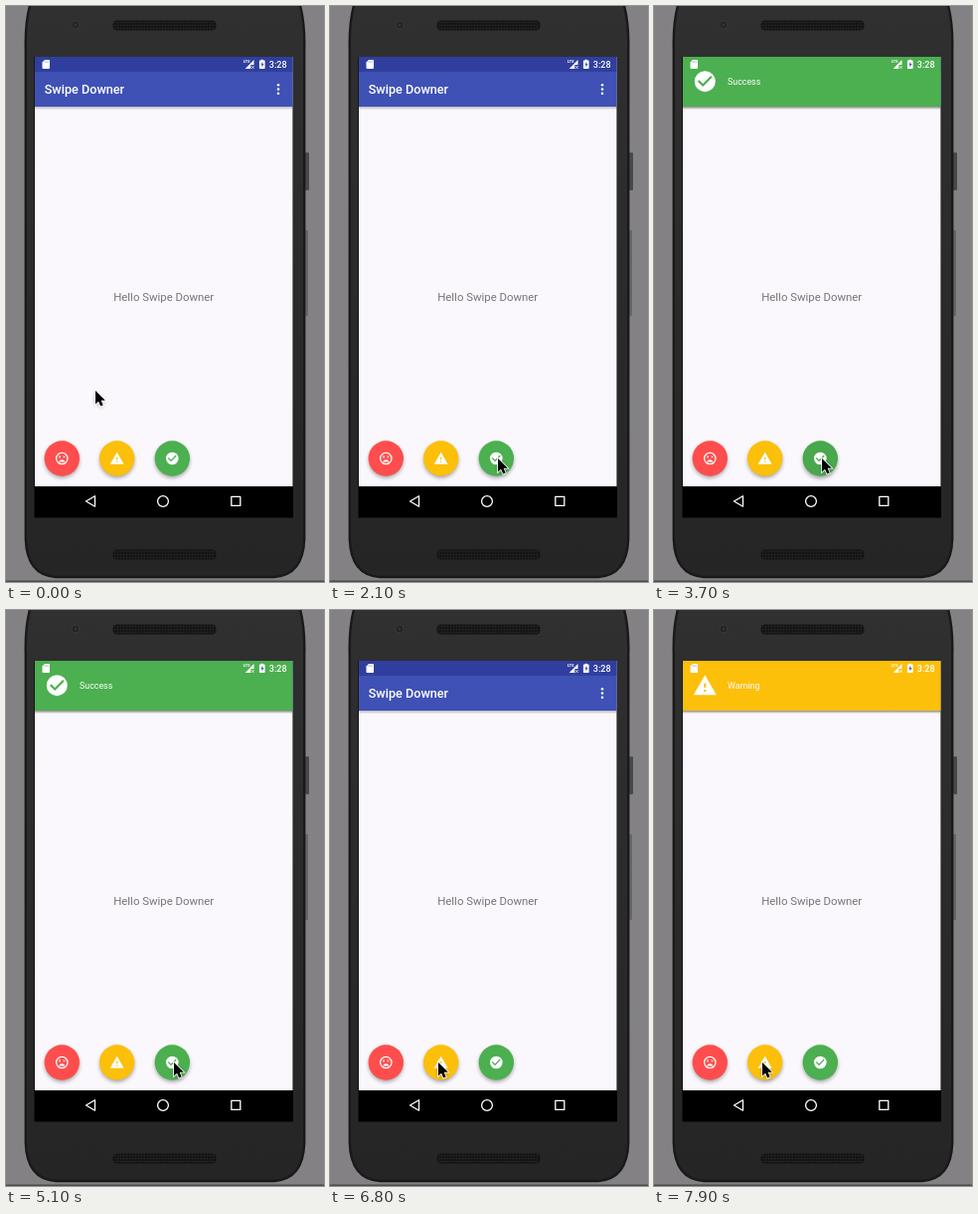
Write an HTML page that moves like this. It is 320x578 px and loops after 8 s.

```html
<!DOCTYPE html>
<html lang="en">
<head>
<meta charset="utf-8">
<title>Swipe Downer</title>
<style>
  html, body { margin: 0; width: 100%; height: 100%; overflow: hidden; background: #838183; }
  svg { display: block; width: 100%; height: 100%; }
  text { font-family: Roboto, sans-serif; }
</style>
</head>
<body>
<svg viewBox="0 0 320 578">
  <defs>
    <linearGradient id="body" x2="0" y2="1">
      <stop offset="0" stop-color="#303031"/>
      <stop offset="1" stop-color="#252526"/>
    </linearGradient>
    <linearGradient id="fade" x2="0" y2="1">
      <stop offset="0" stop-color="#000" stop-opacity=".24"/>
      <stop offset="1" stop-color="#000" stop-opacity="0"/>
    </linearGradient>
    <pattern id="grille" width="3" height="3" patternUnits="userSpaceOnUse">
      <rect width="3" height="3" fill="#151516"/>
      <circle cx="1.5" cy="1.5" r=".8" fill="#29292a"/>
    </pattern>
    <filter id="blur" x="-50%" y="-50%" width="200%" height="200%"><feGaussianBlur stdDeviation="1.9"/></filter>
    <clipPath id="screen"><rect x="29" y="51" width="259.5" height="431"/></clipPath>
    <path id="check" d="M12 2a10 10 0 1 0 0 20 10 10 0 0 0 0-20zm-2 15-5-5 1.4-1.4 3.6 3.6 7.6-7.6L19 8z"/>
    <path id="warn" d="M1 21h22L12 2zm12-3h-2v-2h2zm0-4h-2v-4h2z"/>
    <g id="sad">
      <circle cx="12" cy="12" r="9" fill="none" stroke="#fff" stroke-width="2"/>
      <path d="M6.9 17.5a5.5 5.5 0 0 1 10.2 0z"/>
      <path d="M7 8l3 3M10 8l-3 3M14 8l3 3M17 8l-3 3" stroke="#fff" stroke-width="1.4"/>
    </g>
  </defs>

  <!-- phone -->
  <rect x="301" y="147" width="4" height="38" rx="1" fill="#49484a"/>
  <rect x="301" y="225" width="3" height="86" rx="1" fill="#666567"/>
  <rect y="576.5" width="320" height="1.5" fill="#4c4b4d"/>
  <path d="M25 -4Q19 15 19.8 45V535Q21 571 50 573H270Q299 571 300.2 535V45Q301 15 295 -4Z" fill="url(#body)" stroke="#19191a" stroke-width="2.4"/>
  <rect x="108" y="15" width="103" height="9" rx="3" fill="url(#grille)" stroke="#151516"/>
  <rect x="108" y="546" width="103" height="9" rx="3" fill="url(#grille)" stroke="#151516"/>
  <circle cx="70" cy="19" r="3.8" fill="#202022" stroke="#39393b"/>
  <circle cx="70" cy="19" r="1.7" fill="#343438"/>

  <!-- app -->
  <rect x="28.5" y="51" width="260.5" height="462.5"/>
  <g clip-path="url(#screen)">
    <rect x="29" y="51" width="260" height="431" fill="#faf8fc"/>
    <rect x="29" y="101" width="260" height="3.5" fill="url(#fade)"/>
    <rect x="29" y="51" width="260" height="15" fill="#303f9f"/>
    <rect x="29" y="66" width="260" height="35" fill="#3f51b5"/>
    <text x="38.7" y="88" font-size="12.64" font-weight="500" fill="#fff">Swipe Downer</text>
    <g fill="#fff">
      <circle cx="274" cy="79.3" r="1.25"/><circle cx="274" cy="83.5" r="1.25"/><circle cx="274" cy="87.7" r="1.25"/>
    </g>
    <text x="158.7" y="296" font-size="11.38" text-anchor="middle" fill="#757476">Hello Swipe Downer</text>
    <g id="buttons"></g>
    <g id="banner">
      <rect x="29" y="101" width="260" height="2.5" fill="url(#fade)"/>
      <rect id="bannerFill" x="29" y="51" width="260" height="50"/>
      <use id="bannerIcon" transform="translate(38.7 63.1) scale(1.05)" fill="#fff"/>
      <text id="bannerText" x="74" y="79.2" font-size="8.85" fill="#fff"></text>
    </g>
  </g>

  <!-- status bar -->
  <g fill="#fff">
    <path d="M39 54h4.2q.8 0 .8.8V62q0 .9-.8.9h-5.9q-.8 0-.8-.9v-5.4z"/>
    <path d="M39.2 55.3v1.7M40.8 55.3v1.7M42.3 55.3v1.7" stroke="#8b93c8" stroke-width=".6"/>
    <text x="238.7" y="57.4" font-size="4.2" font-weight="700">LTE</text>
    <path d="M249.5 54v5.1h-3.2v3.8h-5.6z"/>
    <path d="M247.2 60.2l2.5 2.6m0-2.6l-2.5 2.6" stroke="#fff" stroke-width=".8"/>
    <path d="M256.7 54.6v-.9h2v.9h1.4q.5 0 .5.6V62q0 .9-.6.9h-4.5q-.6 0-.6-.9v-6.8q0-.6.5-.6z"/>
    <path d="M258.3 55.8l-1.9 3.4h1.2v2.4l1.9-3.5h-1.2z" fill="#48539f"/>
    <text x="264.8" y="62" font-size="9" font-weight="500">3:28</text>
  </g>

  <!-- navigation bar -->
  <g fill="none" stroke="#fff" stroke-width="1.3" stroke-linejoin="round">
    <path d="M80.5 497l9-5.2v10.4z"/>
    <circle cx="158" cy="497" r="5.4"/>
    <rect x="226.8" y="492.4" width="9" height="9"/>
  </g>

  <g id="cursor">
    <path d="M0 1.5V15L3.2 12 5.3 17l2.6-1.1-2.1-4.8H10z" fill="#000" opacity=".3" filter="url(#blur)"/>
    <path d="M0 0V13.6L3.1 10.7 5.2 15.6 7.7 14.5 5.6 9.8H9.8z" stroke="#fff" stroke-width="1.6" paint-order="stroke"/>
  </g>
</svg>

<script>
const LOOP = 8000;
const $ = id => document.getElementById(id);
const clamp = v => Math.max(0, Math.min(1, v));
const progress = (t, start, length) => clamp((t - start) / length);
const ease = p => (1 - Math.cos(Math.PI * p)) / 2;

const kinds = [
  { icon: 'sad', color: '#ff4d4d', x: 56.3 },
  { icon: 'warn', color: '#fcbf0a', x: 111.7, label: 'Warning', press: 6800 },
  { icon: 'check', color: '#4caf50', x: 167.3, label: 'Success', press: 3000, hide: 5180 }
];

// time, x, y of the pointer tip
const pointer = [
  [100, 90, 386], [1100, 169, 454], [5500, 169, 454],
  [5700, 167.5, 449], [6600, 109, 454], [LOOP, 109, 454]
];

$('buttons').innerHTML = kinds.map(({ icon, color, x }) => `
  <g transform="translate(${x} 454)">
    <circle class="shadow" cy="2.2" r="17.2" opacity=".38" filter="url(#blur)"/>
    <circle r="17.7" fill="${color}"/>
    <circle class="ripple" r="17.7" opacity="0"/>
    <use href="#${icon}" transform="scale(.632) translate(-12 -12)" fill="#fff"/>
  </g>`).join('');
const shadows = document.querySelectorAll('.shadow');
const ripples = document.querySelectorAll('.ripple');

function pointerAt(t) {
  let i = 0;
  while (i < pointer.length - 2 && t > pointer[i + 1][0]) i++;
  const [t0, x0, y0] = pointer[i], [t1, x1, y1] = pointer[i + 1];
  const p = ease(progress(t, t0, t1 - t0));
  return [x0 + (x1 - x0) * p, y0 + (y1 - y0) * p];
}

function drawBanner(t) {
  const kind = kinds.find(k => k.press && t >= k.press && t < k.press + 3000);
  $('banner').style.display = kind ? '' : 'none';
  if (!kind) return;
  const shown = ease(progress(t, kind.press + 150, 400)) -
    (kind.hide ? ease(progress(t, kind.hide, 400)) : 0);
  $('bannerFill').setAttribute('fill', kind.color);
  $('bannerIcon').setAttribute('href', '#' + kind.icon);
  $('bannerText').textContent = kind.label;
  $('banner').setAttribute('transform', `translate(0 ${-53.5 * (1 - shown)})`);
}

function drawButtons(t) {
  kinds.forEach(({ press }, i) => {
    if (!press) return;
    const down = progress(t, press, 250), up = progress(t, press + 350, 450);
    const held = down * (1 - up);
    ripples[i].setAttribute('r', 17.7 * ease(down));
    ripples[i].setAttribute('opacity', .2 * held);
    shadows[i].setAttribute('cy', 2.2 + 2.3 * held);
  });
}

function frame(now) {
  const t = now % LOOP;
  drawButtons(t);
  drawBanner(t);
  $('cursor').setAttribute('transform', `translate(${pointerAt(t)})`);
  requestAnimationFrame(frame);
}
frame(0);
</script>
</body>
</html>
```
